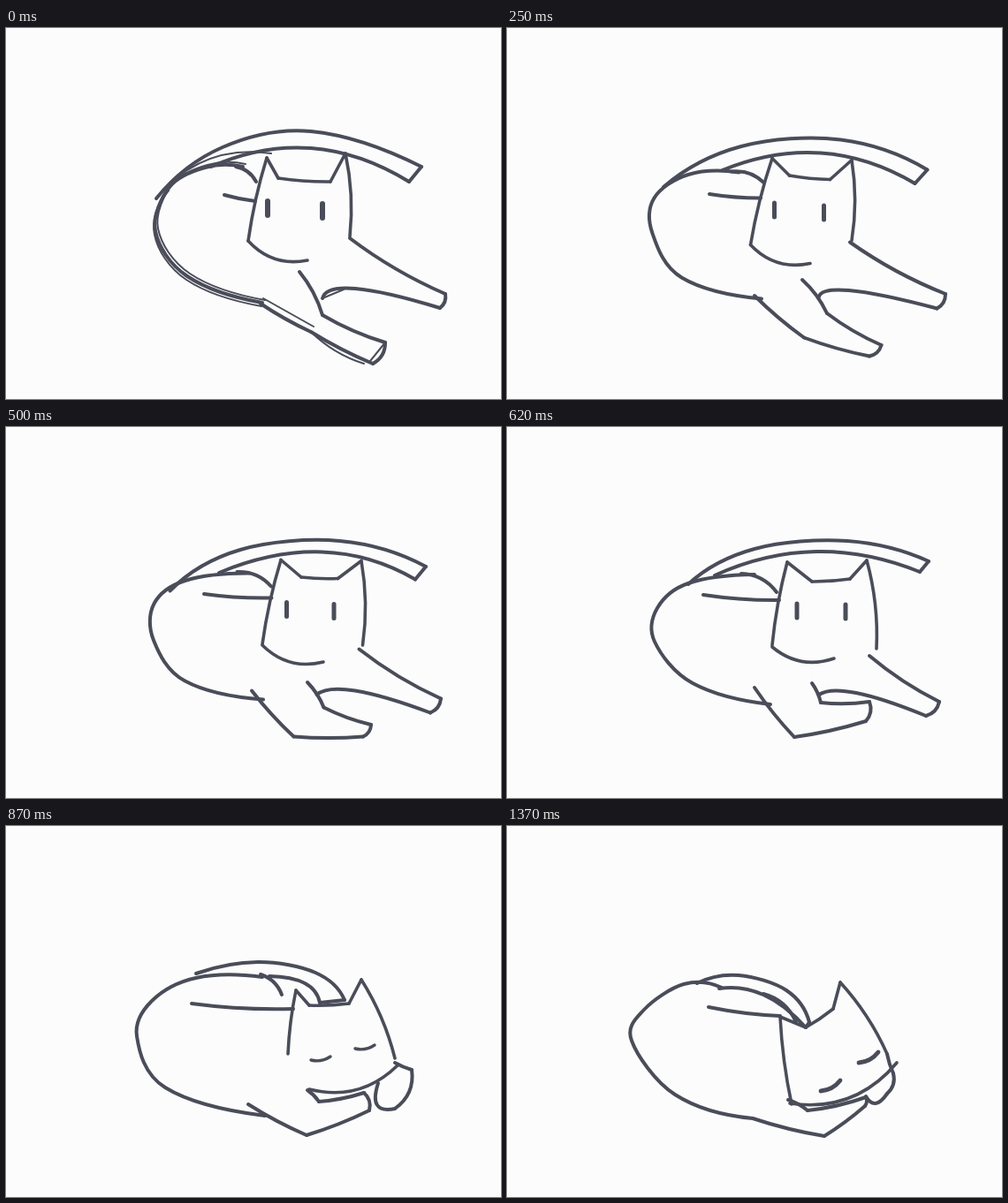
An HTML page with a canvas for the animation above (3000 ms loop, 560 by 420 pixels).

```html
<!DOCTYPE html>
<html lang="en">
<head>
<meta charset="utf-8">
<title>Cat curling up</title>
<style>
html, body { margin: 0; width: 560px; height: 420px; overflow: hidden; background: #fcfcfc; }
canvas { display: block; }
</style>
</head>
<body>
<canvas id="stage" width="560" height="420"></canvas>
<script>
const ctx = document.getElementById('stage').getContext('2d');
const LOOP = 3000;
const STEPS = [0, 120, 250, 370, 500, 620, 750, 870, 1000, 1120, 1250, 1370];

// Landmarks of each key pose as x, y pairs; eyes end with half stroke dx, dy and width.
// head: left ear, chin, crown left, crown right, right ear, cheek
// far: shoulder, paw top, paw bottom, underside, elbow
// near: elbow, knee, paw top, paw bottom
const poses = [];
const addPose = p => poses.push(p);

addPose({
  back: [268,157, 225,158, 185,180, 169,230, 205,281, 290,311],
  tail: [170,193, 245,135, 345,117, 470,157],
  under: [232,157, 345,136, 456,174],
  shoulder: [260,157, 283,174],
  flank: [247,189, 282,196],
  head: [295,147, 274,241, 308,170, 367,174, 384,142, 389,236],
  jaw: [274,241, 341,263],
  eyes: [296,204, 358,207, 0,8, 6],
  far: [389,238, 497,301, 491,317, 395,295, 358,306],
  near: [332,276, 358,325, 429,356, 415,380],
  chest: [288,312, 345,344]
});
addPose({
  back: [255,163, 210,161, 168,190, 162,225, 200,280, 292,310],
  tail: [188,167, 280,128, 385,124, 478,157],
  under: [240,160, 345,141, 464,171],
  shoulder: [250,163, 286,176],
  flank: [232,188, 281,194],
  head: [295,147, 271,246, 316,169, 368,172, 383,147, 391,238],
  jaw: [271,246, 338,263],
  eyes: [298,207, 358,210, 10,0, 3.4],
  far: [387,241, 497,298, 487,315, 378,298, 355,309],
  near: [331,282, 360,323, 431,355, 418,375],
  chest: [284,304, 346,351]
});
addPose({
  back: [270,164, 200,171, 165,195, 167,240, 195,285, 284,303],
  tail: [166,193, 250,140, 370,129, 473,164],
  under: [247,162, 365,142, 459,181],
  shoulder: [258,162, 295,174],
  flank: [226,188, 293,191],
  head: [305,148, 280,245, 323,165, 363,171, 397,152, 389,243],
  jaw: [280,245, 348,270],
  eyes: [307,205, 359,208, 0,8, 5],
  far: [389,244, 495,304, 486,320, 395,296, 350,303],
  near: [337,288, 364,323, 416,363, 402,368],
  chest: [276,302, 326,350]
});
addPose({
  back: [280,167, 205,177, 170,205, 167,243, 210,290, 298,314],
  tail: [205,178, 280,138, 385,129, 477,152],
  under: [235,168, 350,141, 467,164],
  shoulder: [265,166, 305,187],
  flank: [222,190, 308,196],
  head: [317,153, 300,247, 345,175, 388,172, 407,151, 418,251],
  jaw: [300,249, 370,262],
  eyes: [328,208, 383,209, 0,8, 5],
  far: [410,259, 489,311, 474,327, 395,301, 353,303],
  near: [345,290, 355,312, 410,311, 406,333],
  chest: [280,295, 325,351]
});
addPose({
  back: [290,171, 215,172, 165,198, 148,238, 180,296, 293,328],
  tail: [215,167, 285,154, 350,166, 383,197],
  under: [298,170, 338,178, 355,200],
  shoulder: [288,168, 312,191],
  flank: [210,201, 325,207],
  head: [328,186, 319,258, 343,203, 388,201, 402,174, 440,263],
  jaw: [343,298, 443,271],
  eyes: [356,263, 406,250, 11,-2, 3.4],
  far: [440,268, 459,276, 440,320, 420,316, 421,291],
  near: [341,299, 354,312, 405,302, 411,322],
  chest: [274,315, 340,350]
});
addPose({
  back: [262,177, 210,175, 155,211, 139,245, 175,296, 267,328],
  tail: [226,170, 258,160, 308,180, 336,210],
  under: [258,179, 296,188, 325,212],
  shoulder: [258,179, 313,202],
  flank: [222,201, 325,212],
  head: [325,208, 324,306, 354,218, 390,203, 390,179, 436,264],
  jaw: [326,309, 443,274],
  eyes: [364,286, 411,262, 12,-5, 3.2],
  far: [436,260, 446,282, 440,303, 425,317, 410,308],
  near: [326,309, 350,320, 410,308, 404,325],
  chest: [262,325, 346,350]
});
addPose({
  back: [243,183, 200,179, 155,208, 141,243, 190,304, 278,331],
  tail: [215,178, 262,169, 316,186, 342,222],
  under: [240,184, 290,191, 338,228],
  shoulder: [290,190, 327,222],
  flank: [228,205, 309,215],
  head: [309,216, 322,315, 338,228, 369,207, 377,177, 430,258],
  jaw: [320,314, 441,268],
  eyes: [366,294, 409,262, 11,-6, 4.8],
  far: [430,258, 437,280, 430,303, 417,314, 406,306],
  near: [318,310, 340,322, 406,307, 405,317],
  chest: [278,331, 359,351]
});

const mix = (a, b, k) => a + (b - a) * k;

// Smooth curve through points, with parabolic end pieces.
function spline(c) {
  const p = [], last = c.length / 2 - 1;
  for (let i = 0; i <= last; i++) p.push([c[2 * i], c[2 * i + 1]]);
  const handle = (i, dir) => p[i].map((v, k) => v + dir * (p[i + 1][k] - p[i - 1][k]) / 6);
  const shift = (h, a, b) => h.map((v, k) => v + (a[k] - b[k]) / 3);
  ctx.beginPath();
  ctx.moveTo(...p[0]);
  for (let i = 0; i < last; i++) {
    const a = p[i], b = p[i + 1];
    const out = i ? handle(i, 1) : shift(handle(1, -1), a, b);
    const back = i + 1 < last ? handle(i + 1, -1) : shift(out, b, a);
    ctx.bezierCurveTo(...out, ...back, ...b);
  }
  ctx.stroke();
}

// Line between two points that sags by a share of its length.
function bow(x1, y1, x2, y2, sag = 0) {
  ctx.beginPath();
  ctx.moveTo(x1, y1);
  ctx.quadraticCurveTo((x1 + x2) / 2 - (y2 - y1) * sag * 2, (y1 + y2) / 2 + (x2 - x1) * sag * 2, x2, y2);
  ctx.stroke();
}

function drawBody({ back, tail, under, shoulder, flank, far, near, chest }) {
  spline(back);
  spline(tail);
  spline(under);
  bow(...tail.slice(-2), ...under.slice(-2));
  bow(...shoulder, -0.12);
  bow(...flank, 0.02);
  bow(...far.slice(0, 4), 0.03);
  bow(...far.slice(2, 6), -0.15);
  spline(far.slice(4));
  bow(...near.slice(0, 4), -0.05);
  bow(...near.slice(2, 6), 0.03);
  bow(...near.slice(4), -0.15);
  bow(...chest, 0.02);
  bow(...chest.slice(2), ...near.slice(6), 0.02);
}

function drawHead({ head, jaw, eyes }) {
  const [ear, chin, left, right, ear2, cheek] = [0, 2, 4, 6, 8, 10].map(i => head.slice(i, i + 2));
  bow(...ear, ...chin, 0.02);
  bow(...ear, ...left);
  bow(...left, ...right, 0.02);
  bow(...right, ...ear2);
  bow(...ear2, ...cheek, -0.04);
  bow(...jaw, 0.14);
  const [lx, ly, rx, ry, dx, dy, width] = eyes;
  ctx.lineWidth = width;
  for (const [x, y] of [[lx, ly], [rx, ry]]) bow(x - dx, y - dy, x + dx, y + dy, dx / 100);
}

// Loose second lines of the rough opening sketch.
function roughen({ back, far, near, chest, tail }) {
  ctx.lineWidth = 2;
  spline(back.map((v, i) => v + (i % 2 ? -3 : 3)));
  spline(back.slice(4).map((v, i) => v + (i % 2 ? 4 : -1)));
  bow(...tail.slice(0, 2), 300, 142, -0.14);
  bow(...chest.map((v, i) => v + (i % 2 ? -6 : 3)));
  bow(...chest.slice(2), near[6] - 10, near[7], 0.06);
  bow(near[4], near[5], near[6] - 3, near[7] - 3);
  bow(...far.slice(-2), 382, 296);
}

function tween(a, b, k) {
  const pose = {};
  for (const part in a) {
    // Eyes travel with the head but open or close at once.
    pose[part] = a[part].map((v, i) => part === 'eyes' && i > 3 ? b[part][i] : mix(v, b[part][i], k));
  }
  return pose;
}

function draw(pos) {
  const from = Math.floor(pos);
  const pose = tween(poses[from], poses[Math.ceil(pos)], pos - from);
  ctx.fillStyle = '#fcfcfc';
  ctx.fillRect(0, 0, 560, 420);
  ctx.strokeStyle = '#4a4d59';
  ctx.lineCap = ctx.lineJoin = 'round';
  ctx.lineWidth = 4;
  drawBody(pose);
  ctx.lineWidth = 3.6;
  drawHead(pose);
  if (pos === 0) roughen(pose);
}

let shown = -1;
function tick() {
  const t = performance.now() % LOOP;
  const step = STEPS.filter(s => s <= t).length - 1;
  // After the first drawing, every second one is an in-between.
  if (step !== shown) draw(step && (step + 1) / 2);
  shown = step;
  requestAnimationFrame(tick);
}
tick();
</script>
</body>
</html>
```
